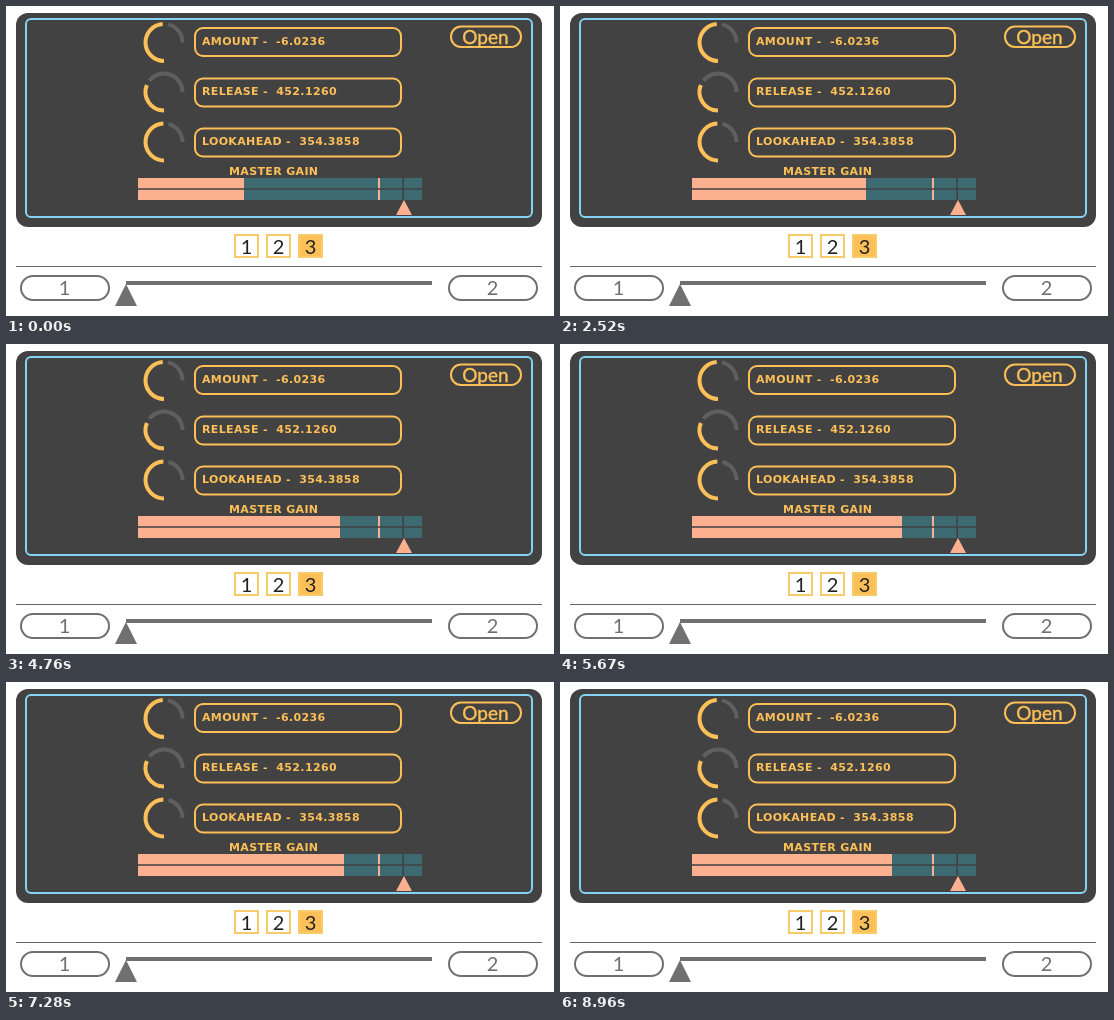
These frames come from a looping animation (548 px wide and 310 px high, 9030 ms). An HTML page:

```html
<!DOCTYPE html>
<html lang="en">
<head>
<meta charset="utf-8">
<title>Limiter panel</title>
<style>
  html, body { margin: 0; width: 100%; height: 100%; overflow: hidden; background: #fff; }
  svg { display: block; width: 548px; height: 310px; }
  .label { font: bold 11px "DejaVu Sans", sans-serif; letter-spacing: .35px; white-space: pre; fill: #fdc058; }
  .ui { font: 20px Lato, sans-serif; text-anchor: middle; }
  .gold { fill: none; stroke: #fdc058; stroke-width: 2; }
  .gray { fill: none; stroke: #707070; stroke-width: 2; }
  .knob { fill: none; stroke-width: 4; }
</style>
</head>
<body>
<svg viewBox="0 0 548 310">
  <rect x="10" y="7" width="526" height="214" rx="12" fill="#424242"/>
  <rect x="20" y="13" width="506" height="198" rx="5" fill="none" stroke="#83d3f5" stroke-width="2"/>
  <g id="controls"></g>

  <rect class="gold" x="445" y="20.5" width="70" height="20.5" rx="10"/>
  <text class="ui" x="479.5" y="37.5" fill="#fdc058" stroke="#fdc058" stroke-width=".4" style="font-size:19px">Open</text>

  <text class="label" x="223" y="169">MASTER GAIN</text>
  <rect x="132" y="172" width="284" height="22" fill="#3e6b72"/>
  <rect id="level" x="132" y="172" height="22" fill="#fdb08f"/>
  <rect x="372" y="172" width="2" height="22" fill="#fdb08f"/>
  <path d="M132 183H416M397.2 172V194" stroke="#424242" stroke-width="1.6"/>
  <path d="M398 194L406 209H390Z" fill="#fdb08f"/>

  <g id="tabs"></g>

  <path d="M10 260.5H536" stroke="#666"/>
  <rect class="gray" x="15" y="270" width="88" height="24" rx="12"/>
  <rect class="gray" x="443" y="270" width="88" height="24" rx="12"/>
  <text class="ui" x="58.5" y="289" fill="#707070">1</text>
  <text class="ui" x="486.5" y="289" fill="#707070">2</text>
  <path d="M120 277H426" stroke="#707070" stroke-width="4"/>
  <path d="M120 278L131 300H109Z" fill="#707070"/>
</svg>
<script>
const LOOP = 9030, STEP = 70, METER_X = 132;
// [time in ms, x of the level's right edge]
const levels = [[0, 238], [1470, 298], [3570, 312], [4760, 334], [6510, 350], [8050, 324], [8960, 332]];
const byId = id => document.getElementById(id);

// Angles run clockwise from the bottom of the knob.
function arc(cy, from, to, color) {
  const point = deg => {
    const a = deg * Math.PI / 180;
    return `${158 - 18.5 * Math.sin(a)} ${cy + 18.5 * Math.cos(a)}`;
  };
  return `<path class="knob" stroke="${color}" d="M${point(from)}A18.5 18.5 0 0 1 ${point(to)}"/>`;
}

const control = ([text, y, cy, turn]) =>
  arc(cy, 0, turn, '#fdc058') + arc(cy, turn + 16, 270, '#5f5f5f') +
  `<rect class="gold" x="189" y="${y}" width="206" height="28" rx="8"/>
   <text class="label" x="196" y="${y + 16.5}">${text}</text>`;

byId('controls').innerHTML = [
  ['AMOUNT -  -6.0236', 22, 36.5, 176],
  ['RELEASE -  452.1260', 72.5, 86, 112],
  ['LOOKAHEAD -  354.3858', 122.5, 136, 178]
].map(control).join('');

byId('tabs').innerHTML = [229, 261, 293].map((x, i) =>
  `<rect x="${x}" y="229" width="23" height="22" fill="${i === 2 ? '#fdc058' : '#fff'}" stroke="#f9ca68" stroke-width="2"/>
   <text class="ui" x="${x + 11.5}" y="247.5" fill="#222">${i + 1}</text>`).join('');

function levelAt(t) {
  const i = Math.max(1, levels.findIndex(([time]) => time >= t));
  const [t0, a] = levels[i - 1], [t1, b] = levels[i];
  return 2 * Math.round((a + (b - a) * (t - t0) / (t1 - t0)) / 2);
}

function draw(time) {
  const t = Math.floor(time % LOOP / STEP) * STEP;
  byId('level').setAttribute('width', levelAt(t) - METER_X);
}

const start = performance.now();
function tick() {
  draw(performance.now() - start);
  requestAnimationFrame(tick);
}
tick();
</script>
</body>
</html>
```
